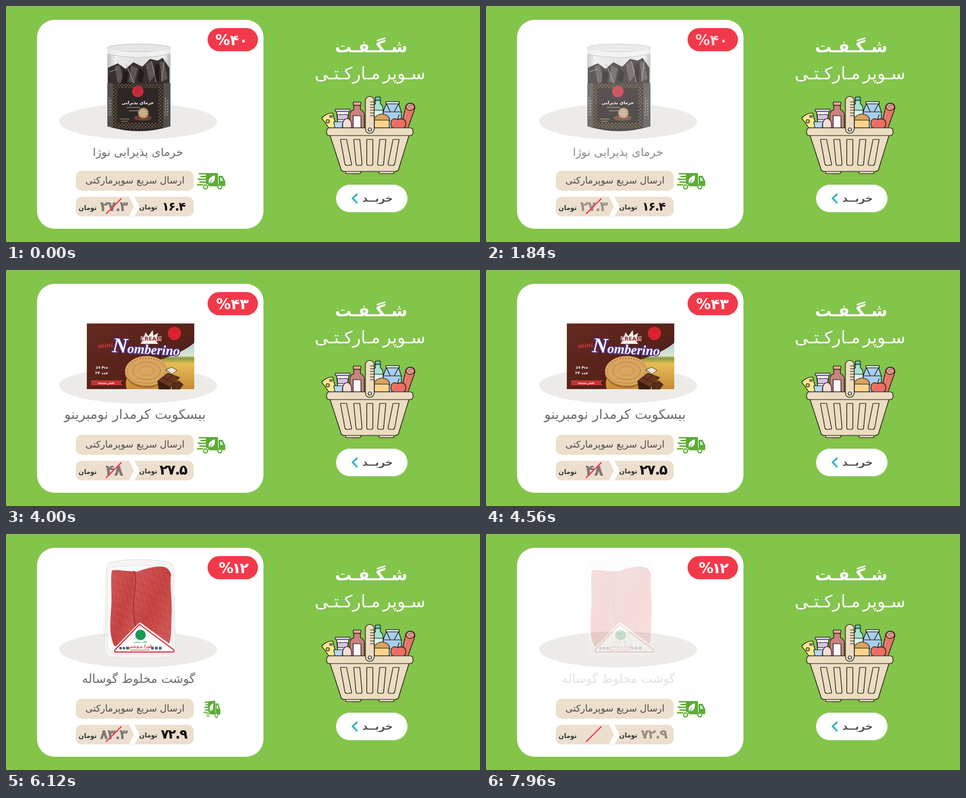
Write an HTML page without scripts that moves like this. It is 856x428 px and loops after 8000 ms.

```html
<!DOCTYPE html>
<html lang="fa">
<head>
<meta charset="utf-8">
<title>شگفت سوپرمارکتی</title>
<style>
html, body { margin: 0; width: 100%; height: 100%; overflow: hidden; background: #83c44b; }
body { position: relative; }
svg { position: absolute; display: block; }
.stage { left: 0; top: 0; width: 856px; height: 428px; }
.truck { left: 343px; top: 300px; width: 54px; height: 35px; overflow: visible; animation: flip 2s infinite; }
text { font-family: "DejaVu Sans", sans-serif; text-anchor: middle; }
.bold { font-weight: 700; }
.name { fill: #6a6a6c; }
.unit { font-size: 11.5px; font-weight: 700; fill: #333; }
.off, .old, .now { font-weight: 700; }
.off { fill: #fff; font-size: 26.5px; }
.old, .now { letter-spacing: -1.5px; }
.old { fill: #7c7975; }
.now { fill: #0c0c0c; }
.item > * { animation: fade 8s linear var(--d) infinite; }
.item > .old { animation-name: fade-old; }
.item > .now { animation-name: fade-now; }
.item > .stay { animation-name: cut; letter-spacing: -2.5px; }
.line { stroke: #14110f; stroke-width: 1.2; stroke-linejoin: round; stroke-linecap: round; }

@keyframes fade { 0%, 22.5% { opacity: 1; } 25%, 100% { opacity: 0; } }
@keyframes fade-old { 0%, 22.5% { opacity: 1; } 24.5%, 100% { opacity: 0; } }
@keyframes fade-now {
  0% { opacity: 1; }
  22.5% { opacity: 1; animation-timing-function: cubic-bezier(.6,0,1,1); }
  25%, 100% { opacity: 0; }
}
@keyframes cut { 0%, 24.99% { opacity: 1; } 25%, 100% { opacity: 0; } }
@keyframes flip {
  0% { transform: perspective(180px) rotateY(0deg); animation-timing-function: cubic-bezier(.3,.08,.7,.92); }
  28%, 100% { transform: perspective(180px) rotateY(-360deg); }
}
</style>
</head>
<body>
<svg class="stage" viewBox="0 0 856 428">
  <defs>
    <linearGradient id="glass">
      <stop offset="0" stop-color="#bdbdbd"/><stop offset=".12" stop-color="#ececec"/>
      <stop offset=".5" stop-color="#dcdcdc"/><stop offset=".9" stop-color="#efefef"/><stop offset="1" stop-color="#b5b5b5"/>
    </linearGradient>
    <linearGradient id="tin">
      <stop offset="0" stop-color="#d5d1cb"/><stop offset=".2" stop-color="#fff"/>
      <stop offset=".8" stop-color="#f7f5f2"/><stop offset="1" stop-color="#c6c1ba"/>
    </linearGradient>
    <linearGradient id="brown">
      <stop offset="0" stop-color="#62301d"/><stop offset=".4" stop-color="#82452c"/><stop offset="1" stop-color="#5a2a19"/>
    </linearGradient>
    <linearGradient id="pack" x2="1" y2="1">
      <stop offset="0" stop-color="#642a20"/><stop offset="1" stop-color="#4c1b14"/>
    </linearGradient>
    <linearGradient id="field" x2="0" y2="1">
      <stop offset="0" stop-color="#a8d2e6"/><stop offset=".28" stop-color="#dfe6cb"/>
      <stop offset=".33" stop-color="#84993f"/><stop offset=".45" stop-color="#e6bd55"/><stop offset="1" stop-color="#c88b33"/>
    </linearGradient>
    <linearGradient id="meat" x2="1" y2="1">
      <stop offset="0" stop-color="#d2565a"/><stop offset=".5" stop-color="#c3423f"/><stop offset="1" stop-color="#d45e5c"/>
    </linearGradient>
    <pattern id="lentils" width="9" height="7" patternUnits="userSpaceOnUse">
      <rect width="9" height="7" fill="#47200f"/>
      <ellipse cx="2" cy="2" rx="2.3" ry="1.7" fill="#85492a"/>
      <ellipse cx="6.5" cy="5" rx="2.3" ry="1.6" fill="#6d3519"/>
      <circle cx="6.5" cy="1.2" r="1" fill="#a2643d"/>
    </pattern>
    <pattern id="fibre" width="11" height="13" patternUnits="userSpaceOnUse" patternTransform="rotate(24)">
      <path d="M1 2v5M5 7v4M8 1v4" stroke="#e58480" stroke-width=".8" opacity=".45"/>
      <path d="M3 9v3M7 6v4M10 9v3" stroke="#a22f30" stroke-width=".8" opacity=".45"/>
    </pattern>
    <pattern id="gold" width="6" height="6" patternUnits="userSpaceOnUse">
      <path d="M3 0 6 3 3 6 0 3z" fill="none" stroke="#8d7552" stroke-width=".7"/>
    </pattern>
  </defs>

  <rect width="856" height="428" fill="#83c44b"/>
  <rect x="56" y="25" width="409" height="379" rx="32" fill="#fff"/>
  <rect x="364" y="40" width="91" height="42" rx="21" fill="#f2394b"/>
  <ellipse cx="238.500" cy="209.500" rx="142.500" ry="32.500" fill="#edebe7"/>
  <g fill="#ecdfcd">
    <rect x="126" y="299" width="213" height="36" rx="11"/>
    <rect x="126" y="346" width="213" height="35.500" rx="11"/>
  </g>
  <path d="M222 346h10l9 17.700-9 17.800h-10l9-17.800z" fill="#fff"/>
  <text x="233" y="322" font-size="16.900" fill="#4d4a4e">ارسال سریع سوپرمارکتی</text>
  <text class="unit" x="257" y="369">تومان</text>
  <text class="unit" x="147.500" y="370">تومان</text>

  <!-- heading and button -->
  <g fill="#fff">
    <text class="bold" x="659.500" y="84" font-size="30">شـگـفـت</text>
    <text x="657.500" y="133" font-size="31" word-spacing="-5">سـوپر مـارکـتـی</text>
    <rect x="596" y="324" width="129" height="50" rx="25"/>
  </g>
  <text class="bold" x="671" y="355" font-size="18.500" fill="#55525a">خریــد</text>
  <path d="M633.500 341.500 626 349l7.500 7.500" fill="none" stroke="#40b7c8" stroke-width="3.600" stroke-linecap="round" stroke-linejoin="round"/>

  <!-- groceries -->
  <g class="line">
    <path d="M570 203q9-9 20-9l7 27h-14z" fill="#fae592"/>
    <g fill="#efc94f"><circle cx="581" cy="209" r="3"/><circle cx="587" cy="200" r="2"/></g>
    <path d="M597 191h22l-3 30h-16z" fill="#f5f2f7"/>
    <rect x="594.500" y="187" width="27" height="4.500" rx="1.500" fill="#d9c2ea"/>
    <path d="M598 197h20l-1 9h-18z" fill="#d9c2ea"/>
    <path d="M592 210h17l-2 11h-13z" fill="#b9d9f2"/>
    <path d="M628 180h12v8c6 3 7 6 7 11v22h-26v-22c0-5 1-8 7-11z" fill="#c9847e"/>
    <rect x="627" y="174" width="14" height="6" rx="1.500" fill="#e9a79f"/>
    <rect x="627" y="199" width="14" height="22" fill="#fff"/>
    <path d="M608 214c0-5 4-10 8-10s8 5 8 10v7h-16z" fill="#f9ddd4"/>
    <path d="M667 171h9v6c4 3 5 7 5 11v33h-18v-33c0-4 1-8 4-11z" fill="#a7e3d3"/>
    <rect x="667" y="165" width="9" height="6" rx="1" fill="#6ecbb5"/>
    <path d="M663 189h18v14h-18z" fill="#e5f7f1"/>
    <path d="M687 177h22l5 15v29h-33v-29z" fill="#a9cdec"/>
    <path d="M681 192h33M687 177l7 15M709 177l-8 15" fill="none"/>
    <rect x="686" y="173.500" width="24" height="4" fill="#d6e8f7"/>
    <path d="m713 221 9-39c2-6 8-7 12-5 4 1 5 6 4 10l-12 34z" fill="#e4776b"/>
    <ellipse cx="730" cy="183" rx="7.500" ry="6.500" fill="#f19b8d"/>
    <g fill="#fff" stroke-width=".5"><circle cx="727" cy="182" r="1.300"/><circle cx="732" cy="180" r="1.300"/><circle cx="731" cy="186" r="1.300"/></g>
    <path d="M664 208c2-8 8-12 15-12 8 0 14 5 14 12z" fill="#d9a35e"/>
    <rect x="665" y="207" width="27" height="14" fill="#fbd689"/>
    <path d="M695 213c0-9 8-10 13-7 6-3 14-1 14 7 0 4-2 7-4 9h-19c-2-2-4-5-4-9z" fill="#ec6f62"/>
    <path d="M708 206c0-4 0-6 2-8" fill="none"/>
  </g>

  <!-- basket -->
  <g class="line" fill="#ecdcc1">
    <path d="M613 298h28v3q0 3-4 3h-20q-4 0-4-3zM673 298h28v3q0 3-4 3h-20q-4 0-4-3z"/>
    <path d="M585 234h143l-19 62q-1 4-6 4h-92q-5 0-6-4z"/>
    <g id="slots">
      <path d="M604 242h11l9 44q0 3-3 3h-5q-3 0-4-3z"/>
      <path d="M628 242h11l4 44q0 3-3 3h-5q-3 0-3-3z"/>
    </g>
    <use href="#slots" transform="matrix(-1 0 0 1 1314 0)"/>
    <path d="M651.500 242h11v44q0 3-3 3h-5q-3 0-3-3z"/>
    <rect x="579" y="221" width="156" height="14" rx="5"/>
    <rect x="649" y="164" width="16" height="67" rx="8"/>
    <path d="M658 174h7M658 179h7M658 184h7M658 189h7M658 194h7M658 199h7" fill="none"/>
    <circle cx="657" cy="224" r="3" fill="#fff"/>
  </g>

  <!-- dates -->
  <g class="item" style="--d:0s">
    <g>
      <path d="M183 76v142q57 18 114 0V76q-57-12-114 0z" fill="url(#glass)"/>
      <g fill="#37302e">
        <path d="m184 112 18-8 14 10 14-12 16 8 14-14 14 3 9-5 12 18v42H184z"/>
        <g fill="#5d5552"><path d="m196 110 9-4 8 30-11 5zM226 108l12 5-6 27-10-3zM252 106l10-7 9 25-12 14zM278 100l8 4 6 28-11 5z"/></g>
        <g fill="#211c1b"><path d="m212 116 10 5-4 20h-10zM241 112l9 9-4 18-9-4zM270 104l7 4-1 30-9-6z"/></g>
        <path d="m186 120 16-6M217 106l14 34M263 100l8 38M286 98l-5 38" fill="none" stroke="#aaa4a1"/>
      </g>
      <path d="M183 140h114v78q-57 18-114 0z" fill="#2d2725"/>
      <path d="M193 141h90v8h-90zM193 212h90v8q-45 6-90 0zM193 149h8v63h-8zM275 149h8v63h-8z" fill="url(#gold)"/>
      <path d="M183 140h10v81l-10-3zM284 140h13v78l-13 3z" fill="#55504e"/>
      <path d="M186 166v35M189 170v30M288 166v35M292 170v30" stroke="#a39d99" stroke-width="1.500" stroke-dasharray="3 2"/>
      <ellipse cx="240" cy="76" rx="57" ry="7" fill="#e6e6e6" stroke="#bcbcbc"/>
      <path d="M183 77v10q57 13 114 0V77q-57 13-114 0z" fill="#f4f4f4" opacity=".75"/>
      <path d="M183 87q57 13 114 0" fill="none" stroke="#c0c0c0"/>
      <circle cx="238" cy="155" r="10.500" fill="#c42b3a"/>
      <text class="bold" x="238" y="178" font-size="8" fill="#fff">خرمای پذیرایی</text>
      <path d="M218 184h24M222 190h18" stroke="#bdaea2" stroke-width="1.200"/>
      <ellipse cx="247" cy="203" rx="16" ry="5" fill="#75452a"/>
      <circle cx="248" cy="194" r="9.500" fill="#c9ae89"/>
      <circle cx="248" cy="194" r="8" fill="none" stroke="#80552e" stroke-width="3" stroke-dasharray="1 3"/>
      <path d="M205 205h18M208 209h12" stroke="#c09a5b" stroke-width="1.200"/>
      <text class="name" x="238.500" y="272" font-size="20.400">خرمای پذیرایی نوژا</text>
    </g>
    <text class="off" x="407.500" y="71">%۴۰</text>
    <text class="old" x="194.500" y="372" font-size="25">۲۷.۳</text>
    <text class="now" x="302.500" y="371" font-size="21.500">۱۶.۴</text>
  </g>

  <!-- lentils -->
  <g class="item" style="--d:-6s">
    <g>
      <path d="M193 84v136q50 9 100 0V84z" fill="url(#tin)"/>
      <path d="M193 119h100v32H193z" fill="url(#brown)"/>
      <path d="M197 176h86c2 19-10 40-43 40s-45-21-43-40z" fill="#e9e5df" stroke="#cdc6bd"/>
      <ellipse cx="240" cy="181" rx="43" ry="25" fill="#fff"/>
      <ellipse cx="240" cy="181" rx="40" ry="24" fill="url(#lentils)"/>
      <circle cx="278" cy="201" r="7" fill="#b23425"/>
      <path d="M193 82q50-5 100 0v3q-50 5-100 0zM193 218q50 8 100 0v3q-50 8-100 0z" fill="#b49a65"/>
      <text class="bold" x="220" y="112" font-size="19" fill="#d0323d">qelu</text>
      <path d="M246 92v23" stroke="#d0323d" stroke-width="1.300"/>
      <circle cx="263" cy="104" r="14" fill="#d0323d"/>
      <text class="bold" x="239" y="135" font-size="9.500" fill="#fff" style="font-family:'Noto Serif',serif">Barley Bowl</text>
      <text class="bold" x="239" y="145" font-size="5.400" fill="#fff">کنسرو خوراک عدسی</text>
      <text class="name" x="232.500" y="270" font-size="21.700">کنسرو خوراک عدسی</text>
    </g>
    <text class="off" x="408" y="71">%۲۸</text>
    <text class="old" x="195.500" y="372" font-size="26">۸.۲</text>
    <text class="now" x="304.500" y="372" font-size="28">۵.۹</text>
  </g>

  <!-- biscuits -->
  <g class="item" style="--d:-4s">
    <g>
      <rect x="146" y="97" width="194" height="119" fill="url(#pack)"/>
      <path d="M340 132v84H218c-6-22 8-40 32-48 30-4 66-16 90-36z" fill="url(#field)"/>
      <circle cx="304" cy="115" r="12" fill="#d9222f"/>
      <ellipse cx="254" cy="187" rx="39" ry="27" fill="#a86d34"/>
      <ellipse cx="254" cy="183" rx="39" ry="27" fill="#d9a661"/>
      <g fill="none" stroke="#b57d3d">
        <ellipse cx="254" cy="183" rx="35" ry="23" stroke-width="2" stroke-dasharray="2 3"/>
        <ellipse cx="254" cy="183" rx="25" ry="16"/>
        <ellipse cx="254" cy="183" rx="14" ry="8" stroke-dasharray="3 2"/>
      </g>
      <g stroke="#2c120c" stroke-width=".8">
        <path d="m274 201 18-14 22 8-17 18z" fill="#6a3720"/>
        <path d="m274 201 23 12v3h-21z" fill="#3e1c12"/>
        <path d="m283 195 22 11M302 190l-17 15" fill="none"/>
        <path d="m300 208 12-7 8 7-6 8h-14z" fill="#5b2d1b"/>
        <path d="m289 181 10-5 10 6-9 7z" fill="#f0e2ce"/>
      </g>
      <text x="253" y="152" font-size="24" font-weight="700" font-style="italic" fill="#fff" stroke="#51348c" stroke-width="3.500" paint-order="stroke" transform="rotate(3 253 144)" style="font-family:'Liberation Serif',serif"><tspan font-size="38">N</tspan>omberino</text>
      <path d="m243 120 6 2 3-9 5 7 8-11 1 10 9-5-3 9 8 2-9 4 4 5h-32l4-7z" fill="#f6f0e8"/>
      <text class="bold" x="262" y="128" font-size="9.500" fill="#8a2430" stroke="#fff" stroke-width="1.500" paint-order="stroke">CREAM</text>
      <text class="bold" x="180" y="141" font-size="11.500" font-style="italic" fill="#d23a3c" transform="rotate(-5 180 141)" style="font-family:'Noto Serif',serif">mini</text>
      <text class="bold" x="173" y="179" font-size="6" fill="#fff">24 Pcs</text>
      <text class="bold" x="173" y="189" font-size="7" fill="#fff">۲۴ عدد</text>
      <path d="M154 200h57l-4 4.500 4 4.500h-57z" fill="#c33334"/>
      <text class="bold" x="181" y="206.500" font-size="4.500" fill="#fff">Cocoa کاکائو</text>
      <text class="name" x="233" y="270" font-size="24.200">بیسکویت کرمدار نومبرینو</text>
    </g>
    <text class="off" x="409" y="71">%۴۳</text>
    <text class="old" x="195" y="373" font-size="28">۴۸</text>
    <text class="now" x="302" y="371" font-size="25">۲۷.۵</text>
  </g>

  <!-- meat -->
  <g class="item" style="--d:-2s">
    <g>
      <path d="M192 50q48-8 98 0 13 2 13 15l3 142q0 15-15 16-50 4-98 0-15-1-15-16l3-142q0-13 11-15z" fill="#f5f4f3" stroke="#e3e1df"/>
      <path d="M190 61q50-8 102 0 7 1 7 9l2 132q0 12-11 13-50 4-96 0-11-1-11-13l1-132q0-8 6-9z" fill="#fbfafa" stroke="#e9e7e5"/>
      <path d="M191 66c12-3 28 3 42 1 4 20-4 44-3 68 2 25 7 45 6 69-16 8-31 6-41-2-10-23-6-47-5-70 2-23-2-44 1-66z" fill="url(#meat)"/>
      <path d="M233 69c15-4 29-10 46-10 11 0 16 5 19 14-3 25 3 49 1 75-1 22 1 40-6 55-17 8-40 8-57 1-3-25-8-46-7-70 0-24 2-45 4-65z" fill="url(#meat)"/>
      <path d="M191 66c12-3 28 3 42 1 15-4 29-8 46-8 11 0 16 5 19 14 1 43 3 95-5 130-28 10-72 9-98-1-9-37-5-92-4-136z" fill="url(#fibre)"/>
      <path d="M233 68c4 20-4 44-3 68 1 16 4 30 6 46" fill="none" stroke="#8f2a2c" stroke-width="1.800" opacity=".65"/>
      <path d="m242 163 62 46q3 5-3 6H199q-7-1-2-6z" fill="#fff" stroke="#fff" stroke-width="5" stroke-linejoin="round"/>
      <path d="m241 164 62 46q2 4-2 4H199q-5 0-2-4z" fill="#fff" stroke="#d92938" stroke-width="2" stroke-linejoin="round"/>
      <circle cx="243" cy="183" r="9.500" fill="#189a57"/>
      <text class="bold" x="242" y="197" font-size="3.800" fill="#189a57">قالب مجلسی</text>
      <text class="bold" x="242" y="206" font-size="7" fill="#d92938">لوژا پروتئین</text>
      <g fill="#55606d"><circle cx="207" cy="207" r="2.500"/><circle cx="213" cy="207" r="2.500"/><rect x="217" y="204.500" width="5" height="5"/><rect x="262" y="204.500" width="5" height="5"/><rect x="269" y="204.500" width="5" height="5"/><rect x="276" y="204.500" width="5" height="5"/></g>
      <path d="M224 210.500h36" stroke="#d92938" stroke-width="1"/>
      <text class="name" x="239.500" y="270" font-size="21.800">گوشت مخلوط گوساله</text>
    </g>
    <text class="off stay" x="410" y="71">%۱۲</text>
    <text class="old" x="194" y="372" font-size="25">۸۳.۳</text>
    <text class="now" x="303" y="371" font-size="24">۷۲.۹</text>
  </g>

  <path d="m180.500 377 28-28" stroke="#f4365a" stroke-width="2.300"/>
</svg>

<svg class="truck" viewBox="343 300 54 35">
  <g fill="#5dab36">
    <path d="M361 303h20q2 0 2 2v22h-17a6 6 0 0 0-5-5z"/>
    <path d="M384 308h5q2 0 3 2l3 6q1 1 1 3v6q0 2-2 2h-2a6 6 0 0 0-8-2z"/>
    <path d="M348 303h14v2.500h-14zM351 308h11v2.500h-11zM346 313h16v2.500h-16zM349 318h13v2.500h-13zM345 323h11v2.500h-11z"/>
  </g>
  <path d="M387 311h2l3 6h-5z" fill="#fff"/>
  <path d="M367 322c-3-7 1-12 10-15 1 8-1 14-8 14l5-9q-4 4-7 10z" fill="#fff"/>
  <g fill="#fff" stroke="#5dab36" stroke-width="2.200"><circle cx="360.500" cy="328" r="3.600"/><circle cx="386" cy="328" r="3.600"/></g>
</svg>
</body>
</html>
```
